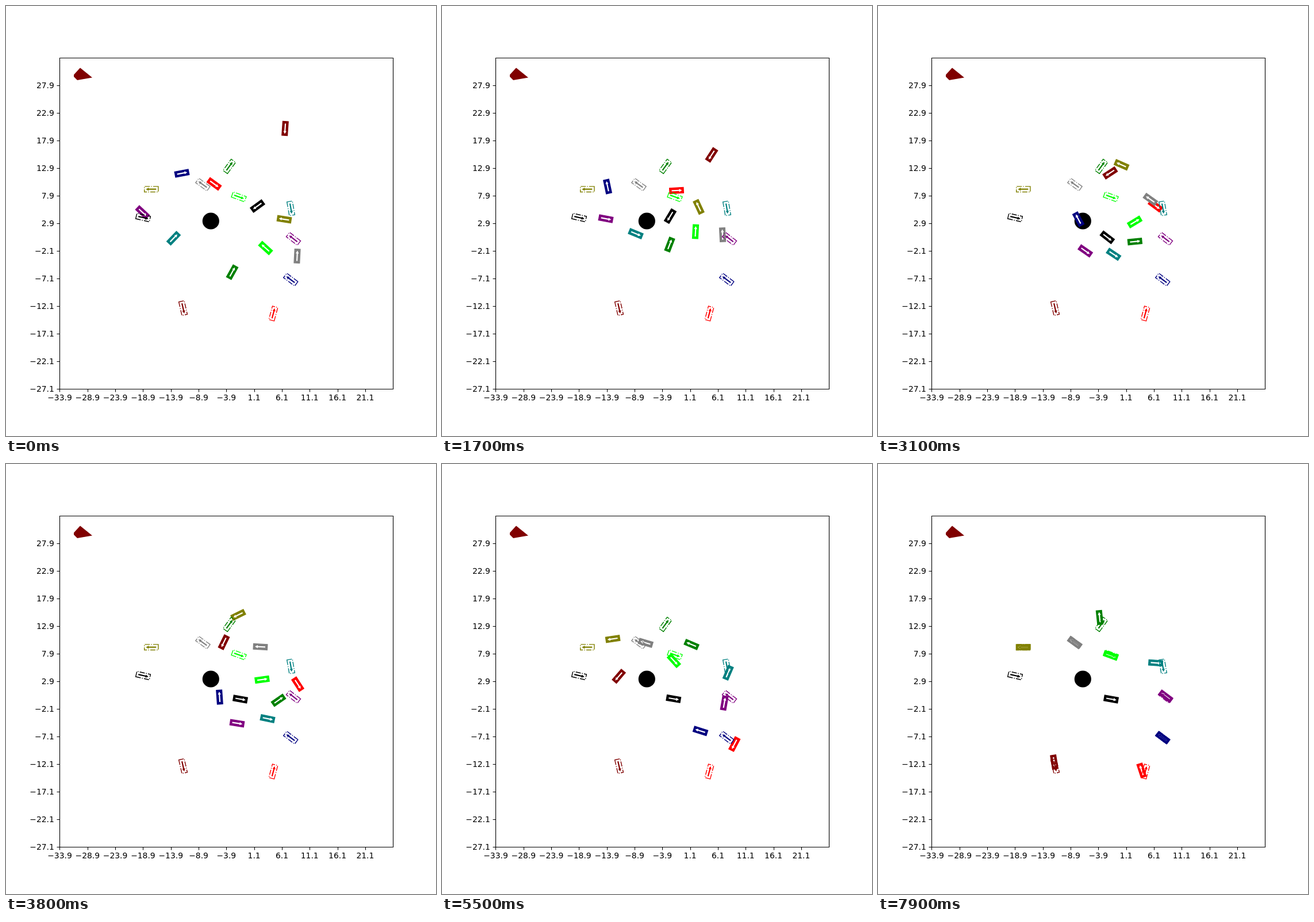
Write an HTML page that moves like this. It is 748 px wide and 748 px high and loops after 8000 ms.

```html
<!DOCTYPE html>
<html lang="en">
<head>
<meta charset="utf-8">
<title>Vehicles driving to their goals</title>
<style>
  html, body { margin: 0; width: 100%; height: 100%; overflow: hidden; background: #fff; }
  svg { display: block; width: 748px; height: 748px; }
  text { font: 13.89px "DejaVu Sans", sans-serif; }
  .axis { fill: none; stroke: #000; stroke-width: 1.11; }
  .goal { fill: none; stroke-width: 1.39; stroke-dasharray: 8.9 2.2 1.4 2.2; }
</style>
</head>
<body>
<svg viewBox="0 0 748 748">
  <path d="M129 107.5L150 124.5L124 129L118 123V119.5Z" fill="maroon"/>
  <circle cx="356.3" cy="374" r="14.6"/>
  <g id="cars"></g>
  <g id="goals"></g>
  <g id="axes"><path class="axis" d="M93.5 90.5H673.5V666.5H93.5Z"/></g>
</svg>
<script>
const LOOP = 8000, STEP = 100;
const KEYS = [0, 16, 23, 37, 47, 62, 78];
const BODY = "M-12.1 4.8H12.1V-4.8H-12.1Z";
const ARROW = "M-8.5 -1.1H4.5V-2.7L9.5 0L4.5 2.7V1.1H-8.5Z";
const byId = id => document.getElementById(id);
const cars = [];

function add(parent, tag, attrs, text = "") {
  const el = document.createElementNS("http://www.w3.org/2000/svg", tag);
  for (const name in attrs) el.setAttribute(name, attrs[name]);
  el.textContent = text;
  return parent.appendChild(el);
}

const place = (el, x, y, angle) =>
  el.setAttribute("transform", `translate(${x} ${y}) rotate(${angle})`);

// Axes
const label = v => v.toFixed(1).replace("-", "\u2212");
const snap = v => Math.round(v) + 0.5;
for (let k = 0; k < 12; k++) {
  const x = 93.49 + k * 48.308, y = 665.72 - k * 47.997;
  const axes = byId("axes");
  if (k < 12) {
    add(axes, "path", { class: "axis", d: `M${snap(x)} 667v4.5M93 ${snap(y)}h-4.5` });
    add(axes, "text", { x, y: 686, "text-anchor": "middle" }, label(-33.9 + 5 * k));
    add(axes, "text", { x: 83.8, y: y + 5.2, "text-anchor": "end" }, label(-27.1 + 5 * k));
  }
}

// Rates at the keys: at rest at both ends and wherever the direction flips
function keyRates(deltas) {
  const rates = deltas.map((d, i) => d / (KEYS[i + 1] - KEYS[i]));
  return KEYS.map((_, i) => {
    const a = rates[i - 1], b = rates[i];
    if (a === undefined || b === undefined || a * b <= 0) return 0;
    const limit = 3 * Math.min(Math.abs(a), Math.abs(b));
    return Math.sign(a) * Math.min(Math.abs(a + b) / 2, limit);
  });
}

function hermite(p, q, v, w, u) {
  const s = 1 - u;
  return s * s * ((1 + 2 * u) * p + u * v) + u * u * ((3 - 2 * u) * q - s * w);
}

// Each pose is [x, y, heading in degrees]; travel is signed, negative in reverse
function car(color, goal, ...poses) {
  const goalEl = add(byId("goals"), "g", {});
  add(goalEl, "path", { class: "goal", d: BODY, stroke: color });
  add(goalEl, "path", { d: ARROW, fill: color });
  place(goalEl, ...goal);

  const el = add(byId("cars"), "g", {});
  add(el, "path", { d: BODY, fill: color, stroke: color, "stroke-width": 1.39 });
  add(el, "path", { d: ARROW, fill: "#fff" });

  const travel = [], turn = [];
  for (let i = 0; i + 1 < poses.length; i++) {
    const [x, y, a] = poses[i], [x2, y2, a2] = poses[i + 1];
    const mid = (a + a2) * Math.PI / 360, dx = x2 - x, dy = y2 - y;
    travel.push(Math.hypot(dx, dy) * Math.sign(dx * Math.cos(mid) + dy * Math.sin(mid)));
    turn.push(a2 - a);
  }
  const speed = keyRates(travel), spin = keyRates(turn);
  const rates = poses.map(([, , a], i) => {
    const r = a * Math.PI / 180;
    return [speed[i] * Math.cos(r), speed[i] * Math.sin(r), spin[i]];
  });
  cars.push({ el, poses, rates });
}

car("maroon", [308, 525.5, 77],
  [485.5, 213, 94], [469, 259, 123], [439, 286, 178], [379, 310, 116],
  [330.5, 337, 164], [306, 424.5, 86], [306.5, 518.5, 81]);
car("navy", [495.3, 476, 217],
  [306, 291, -11], [288, 314, -102], [311, 345, -142], [371.5, 405.5, -94],
  [405, 456, -166], [486, 471.5, -155], [495.3, 476, -143]);
car("red", [465, 535, -75],
  [362, 309.5, 36], [408, 321, -3], [449.5, 322.5, 20], [507.5, 383, 57],
  [526, 442, 114], [490.5, 531, 121], [458.5, 533, 252]);
car("black", [238.5, 368, 13],
  [437.5, 348, 144], [397, 365.5, 121], [389, 386.5, 83], [407.5, 409, 10],
  [400.5, 408, 9], [405.5, 409, 11], [405.5, 409, 10]);
car("olive", [252.8, 318.7, 180],
  [484, 371, 189], [446.5, 349.5, 245], [431, 314.5, 253], [404, 262.5, 154],
  [342, 288, 166], [262, 318, 176], [252.5, 318.8, 180]);
car("gray", [342.5, 310.7, 216],
  [506.5, 435, -87], [488, 398, -93], [489, 369.5, -101], [442.5, 318, -177],
  [382, 313.5, -176], [340, 309.5, -147], [342, 310.5, -144]);
car("lime", [405, 332, 20],
  [451.5, 421, -138], [441, 392.5, -87], [446, 378.5, -54], [445.5, 375, -8],
  [417, 360.5, 40], [396.5, 328, 49], [405, 333, 20]);
car("green", [388.5, 279, -54],
  [393.5, 463, -61], [396, 415, -69], [419.5, 398, 3], [474, 411, -35],
  [460, 354.5, -125], [403, 283.5, -170], [385.5, 267, -96]);
car("teal", [495.5, 352, 80],
  [291.5, 404, -46], [337, 396, 22], [369, 413, 37], [455, 443, 12],
  [492.5, 401, -75], [498.5, 338, -47], [483, 346, 4]);
car("purple", [500, 405, 218],
  [237.5, 359, 43], [285, 370, 11], [327.5, 387, 49], [402, 451, 9],
  [468.5, 438, -28], [499, 399, -130], [500.5, 404, -143]);

function draw(time) {
  const tick = Math.max(0, Math.floor(time % LOOP / STEP) - 1);
  let i = 0;
  while (i < KEYS.length - 2 && tick >= KEYS[i + 1]) i++;
  const span = KEYS[i + 1] - KEYS[i], u = (tick - KEYS[i]) / span;
  for (const { el, poses, rates } of cars) {
    place(el, ...[0, 1, 2].map(c => hermite(
      poses[i][c], poses[i + 1][c], rates[i][c] * span, rates[i + 1][c] * span, u)));
  }
}

const start = performance.now();
function frame() {
  draw(performance.now() - start);
  requestAnimationFrame(frame);
}
frame();
</script>
</body>
</html>
```
